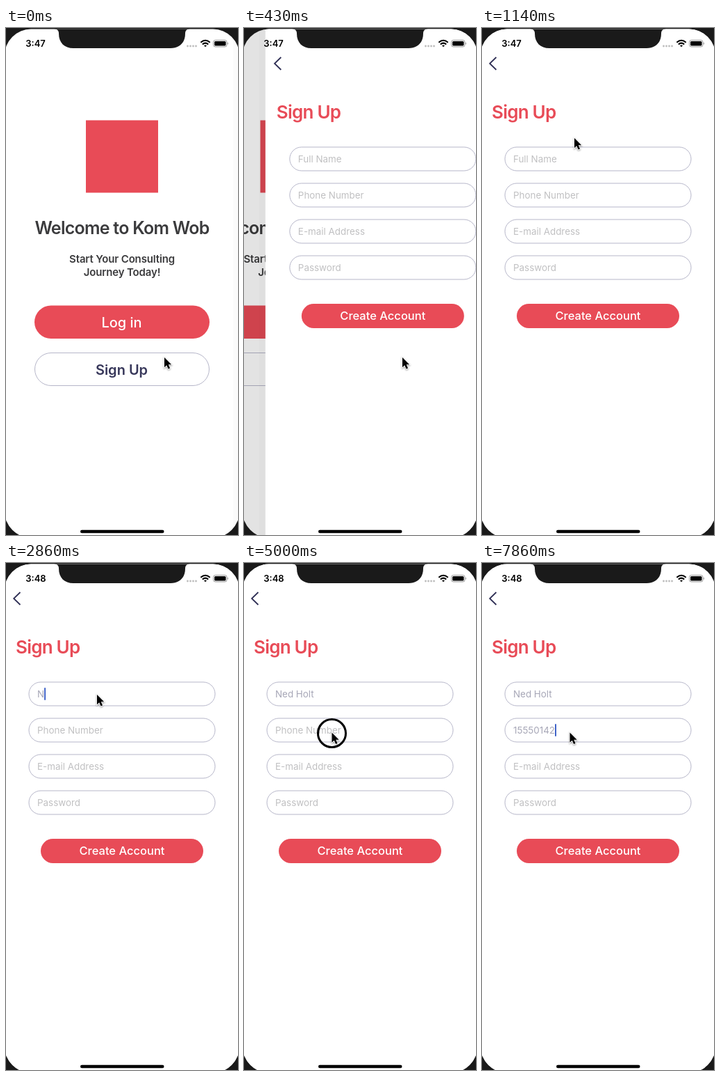
These frames come from a looping animation (334x728 px, 8000 ms). An HTML page:

```html
<!DOCTYPE html>
<html lang="en">
<head>
<meta charset="utf-8">
<style>
  html, body { margin: 0; height: 100%; overflow: hidden; background: #1a1a1a; }
  svg { display: block; width: 334px; height: 728px; }
  text { font-family: Inter, Roboto, sans-serif; white-space: pre; }
  .mid { text-anchor: middle; }
  .semi { font-weight: 600; }
  .big { letter-spacing: -.03em; }
  .sub { font-size: 15px; letter-spacing: -.01em; }
  .hint { font-size: 13.4px; fill: #c0c0c2; }
  .typed { fill: #a7a7b7; }
  .line { fill: #fff; stroke: #b6b6c9; }
  .red { fill: #e84b57; }
</style>
</head>
<body>
<svg viewBox="0 0 334 728">
  <clipPath id="screen"><rect x="-2" y="1.5" width="338" height="730.5" rx="38"/></clipPath>
  <g clip-path="url(#screen)">
    <rect width="334" height="728" fill="#fff"/>
    <g id="home" fill="#3b3b3d">
      <rect class="red" x="115" y="132.5" width="104" height="104"/>
      <text class="mid semi big" x="167" y="296" font-size="25">Welcome to Kom Wob</text>
      <text class="mid semi sub" x="167" y="337">Start Your Consulting</text>
      <text class="mid semi sub" x="167" y="356">Journey Today!</text>
      <rect class="red" x="41" y="398.5" width="252" height="47.5" rx="23.75"/>
      <text class="mid" x="166.5" y="430" font-size="20" font-weight="500" fill="#fff">Log in</text>
      <rect class="line" x="41.5" y="466.5" width="251" height="47" rx="23.5"/>
      <text id="press" class="mid semi" x="166.5" y="497.5" font-size="20" fill="#37375a">Sign Up</text>
    </g>
    <rect id="dim" width="334" height="728"/>
    <g id="form">
      <rect x="-11" width="9" height="728" opacity=".015"/>
      <rect x="-2" width="340" height="728" fill="#fff"/>
      <path d="M20.5 42L11.2 51L20.5 60" fill="none" stroke="#2f2f55" stroke-width="1.8"/>
      <text class="red semi big" x="14" y="130" font-size="26">Sign Up</text>
      <g id="fields"></g>
      <rect id="caret" y="179" width="2" height="18" rx="1" fill="#3f63c8"/>
      <rect class="red" x="50" y="396" width="234" height="35" rx="17.5"/>
      <text class="mid" x="167" y="419.3" font-size="16.5" font-weight="500" fill="#fff">Create Account</text>
    </g>
    <path fill="#1a1a1a" d="M70 0V1.5C74 1.5 76 4 76 8C76 21 84 29 97 29H237C250 29 258 21 258 8C258 4 260 1.5 264 1.5V0Z"/>
    <text id="clock" class="semi" x="28.3" y="27.2" font-size="13"></text>
    <g fill="#bdbdbd">
      <circle cx="261.5" cy="26" r="1.4"/><circle cx="265.5" cy="26" r="1.4"/>
      <circle cx="269.5" cy="26" r="1.4"/><circle cx="273.5" cy="26" r="1.4"/>
    </g>
    <g fill="none" stroke="#000" stroke-width="2">
      <path d="M280.3 20.8Q287 14.8 293.7 20.8M282.8 23.4Q287 19.8 291.2 23.4"/>
      <path d="M287 27.2L285 25.2Q287 23.6 289 25.2Z" fill="#000" stroke="none"/>
    </g>
    <rect x="298.5" y="17.5" width="19.5" height="9.5" rx="2.8" fill="none" stroke="#999"/>
    <rect x="300" y="19" width="16.5" height="6.5" rx="1.5"/>
    <path d="M319 20.5Q321 22.2 319 24Z" fill="#999"/>
    <rect x="107" y="720.8" width="120.5" height="4.4" rx="2.2"/>
  </g>
  <g id="cursor">
    <circle id="ring" cx="0" cy="1" r="20" fill="none" stroke="#000" stroke-width="3"/>
    <path d="M0 0V14.3L3.2 11.3L5.6 16.6L8.1 15.5L5.8 10.3H10.2Z" stroke="#fff" stroke-width="1.6" paint-order="stroke"
      style="filter:drop-shadow(0 1px 1px #0006)"/>
  </g>
</svg>
<script>
const $ = id => document.getElementById(id);
const clamp = v => Math.max(0, Math.min(1, v));
const LOOP = 8000, W = 338;

const hints = ['Full Name', 'Phone Number', 'E-mail Address', 'Password'];
$('fields').innerHTML = hints.map((h, i) => `
  <rect class="line" x="33" y="${171 + 52 * i}" width="268" height="34" rx="17"/>
  <text class="hint" x="45" y="${193 + 52 * i}">${h}</text>`).join('');
const labels = [...$('fields').querySelectorAll('text')];

// focus time and key times of each typed field
const inputs = [
  { text: 'Ned Holt', focus: 1640, keys: [2700, 3100, 3300, 3500, 3700, 3900, 4100, 4300] },
  { text: '15550142', focus: 5100, keys: [7200, 7500, 7550, 7620, 7680, 7750, 7800, 7840] }
];
const clicks = [110, 1540, 4950];
const path = [[600, 228, 473], [1130, 133, 158], [1180, 133, 158], [1450, 131, 189],
  [4450, 131, 189], [4850, 126.5, 243.5]];

function pointer(t) {
  let p = path[0];
  for (const q of path) {
    if (t < q[0]) {
      if (q === p) break;
      const u = clamp((t - p[0]) / (q[0] - p[0])), e = u * u * (3 - 2 * u);
      return [p[1] + (q[1] - p[1]) * e, p[2] + (q[2] - p[2]) * e];
    }
    p = q;
  }
  return [p[1], p[2]];
}

function push(t) {
  // critically damped spring
  const k = Math.max(0, t - 216) * .01826;
  const off = W * (1 + k) * Math.exp(-k), p = 1 - off / W;
  $('form').setAttribute('transform', `translate(${off < .2 ? 0 : off})`);
  $('home').setAttribute('transform', `translate(${-.3 * W * p})`);
  $('dim').setAttribute('opacity', .12 * p);
  const fade = t < 230 ? 1 - .8 * clamp((t - 60) / 70) : .2 + .8 * clamp((t - 230) / 250);
  $('press').setAttribute('opacity', fade);
}

function typing(t) {
  let alpha = 0;
  inputs.forEach(({ text, focus, keys }, i) => {
    const n = keys.filter(k => k <= t).length, el = labels[i];
    el.textContent = n ? text.slice(0, n) : hints[i];
    el.classList.toggle('typed', n > 0);
    const end = inputs[i + 1] ? inputs[i + 1].focus - 170 : LOOP;
    if (t < focus || t >= end) return;
    const since = t - (n ? keys[n - 1] : focus);
    alpha = clamp(.5 + .8 * Math.cos(2 * Math.PI * (since - 200) / 1000));
    if (since < 200) alpha = 1;
    $('caret').setAttribute('x', 45 + (n ? el.getComputedTextLength() : 0));
    $('caret').setAttribute('y', 179 + 52 * i);
  });
  $('caret').setAttribute('opacity', alpha);
}

function draw(now) {
  const t = now % LOOP;
  push(t);
  typing(t);
  $('cursor').setAttribute('transform', `translate(${pointer(t)})`);
  $('ring').setAttribute('opacity', clicks.some(c => t >= c && t < c + 130) ? 1 : 0);
  $('clock').textContent = t < 1800 ? '3:47' : '3:48';
}

const start = performance.now();
function tick() {
  draw(performance.now() - start);
  requestAnimationFrame(tick);
}
tick();
</script>
</body>
</html>
```
